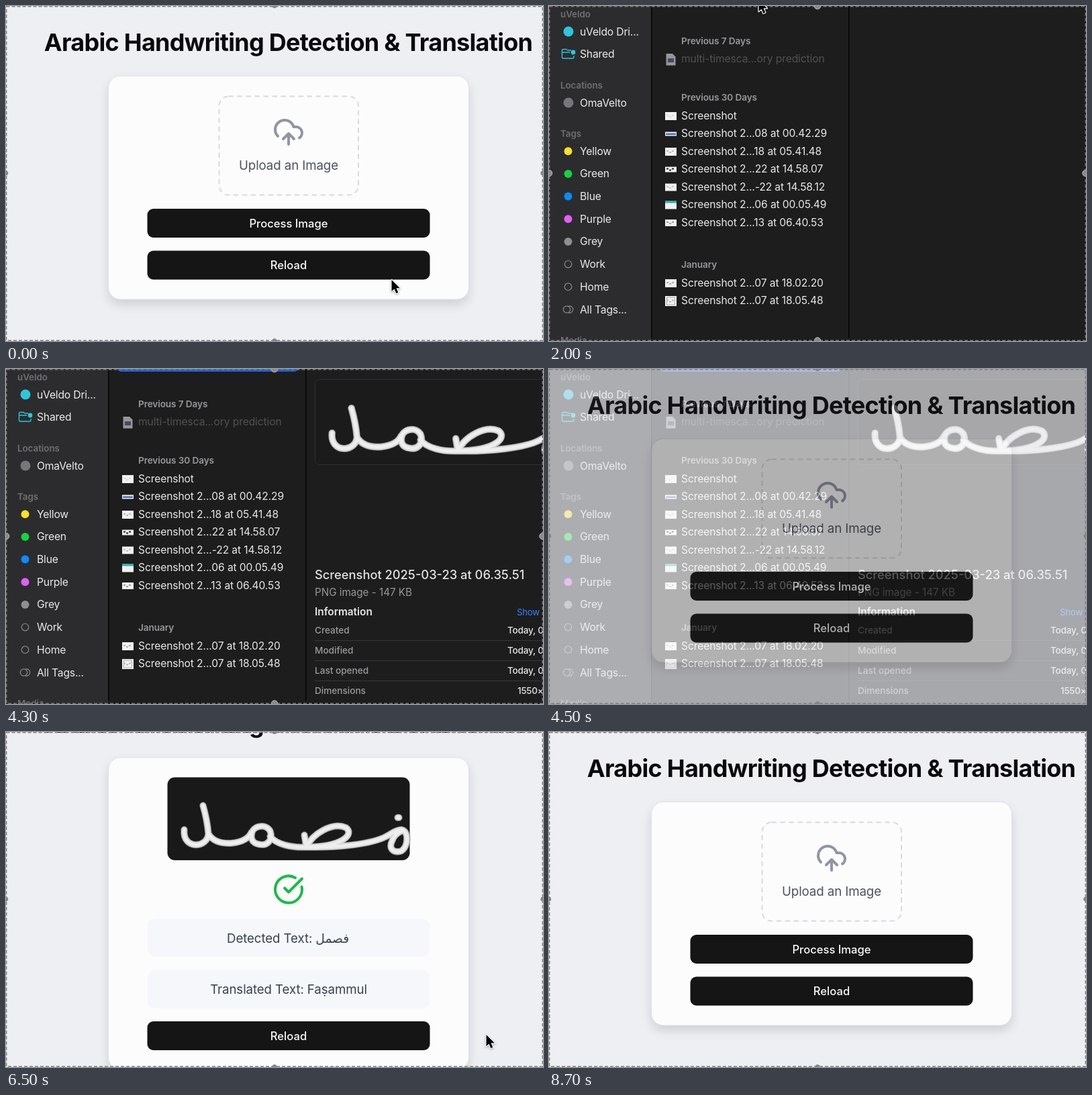
Animation of 800x499 px, one loop 8.8 s. Source, as an HTML page with a canvas:

```html
<!DOCTYPE html>
<html lang="en">
<head>
<meta charset="utf-8">
<title>Arabic Handwriting Detection &amp; Translation</title>
<style>
html, body { margin: 0; width: 100%; height: 100%; overflow: hidden; background: #eeeff3; }
canvas { display: block; width: 800px; height: 499px; }
</style>
</head>
<body>
<canvas id="stage" width="800" height="499"></canvas>
<script>
const W = 800, H = 499, LOOP = 8800, STEP = 100;
const ctx = document.getElementById('stage').getContext('2d');
const FONT = 'Inter, "Noto Sans", "DejaVu Sans", sans-serif';

const clamp = v => Math.max(0, Math.min(1, v));
const ramp = (t, a, b) => clamp((t - a) / (b - a));
const ease = v => v * v * (3 - 2 * v);

function text(s, x, y, size, color, { weight = 400, align = 'left', gap = 0 } = {}) {
  ctx.font = `${weight} ${size}px ${FONT}`;
  ctx.letterSpacing = gap + 'px';
  ctx.textAlign = align;
  ctx.textBaseline = 'alphabetic';
  ctx.fillStyle = color;
  ctx.fillText(s, x, y);
}

function box(x, y, w, h, r, fill, stroke, width = 1) {
  ctx.beginPath();
  ctx.roundRect(x, y, w, h, r);
  if (fill) { ctx.fillStyle = fill; ctx.fill(); }
  if (stroke) { ctx.strokeStyle = stroke; ctx.lineWidth = width; ctx.stroke(); }
}

function dot(x, y, r, fill, stroke, width = 1.2) {
  ctx.beginPath();
  ctx.arc(x, y, r, 0, 7);
  if (fill) { ctx.fillStyle = fill; ctx.fill(); }
  if (stroke) { ctx.strokeStyle = stroke; ctx.lineWidth = width; ctx.stroke(); }
}

// 24-unit line icon centred on x, y
function icon(d, x, y, size, color) {
  ctx.save();
  ctx.translate(x - size / 2, y - size / 2);
  ctx.scale(size / 24, size / 24);
  ctx.strokeStyle = color;
  ctx.lineWidth = 2;
  ctx.lineCap = ctx.lineJoin = 'round';
  ctx.stroke(new Path2D(d));
  ctx.restore();
}

const CLOUD_UP = 'M12 13v8M4 14.899A7 7 0 1 1 15.71 8h1.79a4.5 4.5 0 0 1 2.5 8.242M8 17l4-4 4 4';
const CHECK = 'M21.801 10A10 10 0 1 1 17 3.335M9 11l3 3L22 4';

const INK = new Path2D(
  'M53 42C57 56 60 72 61 84C60 106 22 108 25 78' +
  'M61 84C68 96 82 99 96 98C114 96 122 89 125 82' +
  'M125 86C126 72 146 68 153 80C158 94 148 102 138 100C128 99 123 93 126 82' +
  'M153 88C162 100 185 105 207 104' +
  'M207 104L204 86' +
  'M207 104C216 84 246 66 266 75C278 84 264 103 207 104' +
  'M207 104C250 105 304 100 326 88C334 84 340 78 349 78C360 80 359 104 348 110C336 113 329 106 335 94C338 86 344 82 349 80' +
  'M343 60L345 60');

function word(x, y, k) {
  ctx.save();
  ctx.translate(x, y);
  ctx.scale(k, k);
  ctx.lineCap = ctx.lineJoin = 'round';
  [['#7c7c7c', 10.4], ['#d8d8d8', 8.8], ['#eeeeee', 5]].forEach(([c, w]) => {
    ctx.strokeStyle = c;
    ctx.lineWidth = w;
    ctx.stroke(INK);
  });
  ctx.restore();
}

function button(label, y, hover) {
  box(210.5, y, 421, 43, 9, hover ? '#262626' : '#151515');
  text(label, 421, y + 27.5, 16.6, '#fafafa', { weight: 500, align: 'center' });
}

function field(label, y) {
  box(210.5, y, 421, 57, 12, '#f5f7fb');
  text(label, 421, y + 35.5, 18.7, '#374151', { align: 'center', gap: -0.1 });
}

function picture(y) {
  box(240.5, y, 361, 123.5, 11, '#191919');
  word(240.5, y, 1);
}

const CARD = { upload: 333, ready: 307.5, busy: 306.5, done: 465 };

function page(mode, hover) {
  ctx.fillStyle = '#eeeff3';
  ctx.fillRect(0, 0, W, H);
  const h = CARD[mode], top = 270.5 - h / 2;
  text('Arabic Handwriting Detection & Translation', 420.5, top - 37.5, 36, '#0a0a0c',
    { weight: 700, align: 'center', gap: -0.73 });

  ctx.save();
  ctx.shadowColor = 'rgba(0,0,0,.13)';
  ctx.shadowBlur = 16;
  ctx.shadowOffsetY = 8;
  box(152.5, top, 537, h, 18, '#fcfcfd');
  ctx.restore();
  box(152.5, top, 537, h, 18, null, '#dfe1e6');

  if (mode === 'upload') {
    ctx.setLineDash([7.5, 5.5]);
    box(317.5, top + 30.5, 207.5, 147, 14, null, '#d8dade', 2);
    ctx.setLineDash([]);
    icon(CLOUD_UP, 421, top + 84, 48, '#8f95a3');
    text('Upload an Image', 421, top + 140, 18.7, '#4b5160', { align: 'center', gap: -0.1 });
    button('Process Image', top + 198, false);
    button('Reload', top + 260.5, hover);
    return;
  }
  picture(top + 29.5);
  if (mode === 'done') {
    icon(CHECK, 421, top + 196.5, 48, '#16bd45');
    field('Detected Text: \u2067فصمل\u2069', top + 240);
    field('Translated Text: Faṣammul', top + 316.5);
    button('Reload', top + 393, hover);
    return;
  }
  ctx.globalAlpha = mode === 'busy' ? 0.5 : 1;
  button('Process Image', top + 172.5, false);
  ctx.globalAlpha = 1;
  button('Reload', top + 234.5, hover);
}

const TAGS = [['Yellow', '#ffe11f'], ['Green', '#12d53f'], ['Blue', '#0a8cff'], ['Purple', '#e45df5'], ['Grey', '#8e8e93'],
  ['Work'], ['Home']];

function sidebar(live) {
  const shade = 0.42 + 0.58 * live;
  const head = (s, y) => text(s, 17, y, 13.3, '#707074', { weight: 600 });
  const item = (s, y) => text(s, 46, y + 5.5, 15.7, '#eaeaec', { gap: -0.2 });
  ctx.globalAlpha = live;
  ctx.fillStyle = '#2c2c2f';
  ctx.fillRect(0, -10, 152, H + 20);
  ctx.globalAlpha = 0.75 + 0.25 * live;
  head('uVeldo', 17);
  head('Locations', 122.5);
  head('Tags', 195);
  head('Media', 502.5);
  ctx.globalAlpha = shade;
  dot(29, 38, 7.5, '#2cc6dc');
  item('uVeldo Dri...', 38);
  ctx.lineJoin = 'round';
  ctx.strokeStyle = '#2cc6dc';
  ctx.lineWidth = 1.4;
  ctx.stroke(new Path2D('M33 66H28L26 64.500H21Q19.500 64.500 19.500 66V76Q19.500 78 21.500 78H35Q37 78 37 76V74M19.500 69H31'));
  dot(36, 69, 3.4, '#2cc6dc');
  item('Shared', 71.5);
  dot(29, 144, 7.5, '#77777b');
  item('OmaVelto', 144);
  TAGS.forEach(([name, color], i) => {
    const y = 216.3 + i * 33.65;
    dot(28.5, y, color ? 6 : 5.3, color, color ? null : '#8b8b8f');
    if (color) {
      ctx.globalAlpha = 0.5 * (1 - live);
      dot(28.5, y, 6, '#77777b');
      ctx.globalAlpha = shade;
    }
    item(name, y);
  });
  dot(26.5, 452, 5.2, null, '#8b8b8f');
  ctx.beginPath();
  ctx.arc(30.5, 452, 5.2, -1.9, 1.9);
  ctx.stroke();
  item('All Tags...', 452);
  ctx.globalAlpha = 1;
}

const SHOTS = ['', ' 2...08 at 00.42.29', ' 2...18 at 05.41.48', ' 2...22 at 14.58.07', ' 2...-22 at 14.58.12',
  ' 2...06 at 00.05.49', ' 2...13 at 06.40.53'];
const OLDER = [' 2...07 at 18.02.20', ' 2...07 at 18.05.48'];

function thumb(y, i) {
  const h = [12, 6, 12, 8, 11, 12, 10, 12, 15][i];
  box(173, y - h / 2 + 1, 17, h, 0, '#f1f1f1');
  ctx.fillStyle = ['#d8d8e2', '#3f6fb8', '#b9b9b9', '#222222', '#c4c4c8', '#27b3b5', '#9c9c9c', '#a8b5a8', '#b4b4b4'][i];
  if (i === 1) ctx.fillRect(174, y, 15, 2.5);
  else if (i === 5) ctx.fillRect(173, y - 5, 17, 3);
  else for (let k = 0; k < 3; k++) ctx.fillRect(175 + k * 4, y - 1 + (k % 2) * 2, 3, 2);
  if (i === 8) box(175.5, y - 4.5, 12, 11, 0, null, '#aaa');
}

function files() {
  const head = (s, y) => text(s, 197, y + 5, 13.6, '#98989b', { weight: 600, gap: -0.1 });
  const row = (s, y, i) => {
    thumb(y, i);
    text('Screenshot' + s, 197, y + 5.5, 15.6, '#e9e9ea', { gap: -0.1 });
  };
  head('Previous 7 Days', 52);
  ctx.fillStyle = '#96969b';
  ctx.fill(new Path2D('M174.500 71H184L188.500 75.500V88.500H174.500Z'));
  box(177, 78, 9, 6, 0, '#454a5c');
  text('multi-timesca...ory prediction', 197, 84, 15.6, '#515153', { gap: -0.1 });
  head('Previous 30 Days', 136);
  SHOTS.forEach((s, i) => row(s, 163 + i * 26.5, i));
  head('January', 385);
  OLDER.forEach((s, i) => row(s, 412 + i * 26.5, i + 7));
}

function preview() {
  box(166, -20, 269, 24, 5, '#1e5fd2');
  box(460.5, 15.5, 372, 127, 6, '#1b1b1c', '#303032');
  word(460, 15, 1.03);
  text('Screenshot 2025-03-23 at 06.35.51', 460, 313, 18.3, '#e2e2e3', { weight: 500 });
  text('PNG image - 147 KB', 460, 338, 15.2, '#98989a');
  text('Information', 460, 366.5, 15.4, '#e8e8e9', { weight: 600 });
  text('Show', 761, 366.5, 13.2, '#2f86f5', { gap: -0.2 });
  [['Created', 'Today, 09:14', 747], ['Modified', 'Today, 09:14', 747], ['Last opened', 'Today, 09:14', 747],
    ['Dimensions', '1550×530', 762]].forEach(([name, value, x], i) => {
    const y = 394 + i * 30;
    text(name, 460, y, 13.6, '#9b9b9d', { weight: 500 });
    text(value, x, y, 13.5, '#e6e6e7', { weight: 500, gap: -0.2 });
    if (i < 3) { ctx.fillStyle = '#363638'; ctx.fillRect(460, y + 10, 340, 1); }
  });
}

function dialog(t) {
  const live = ramp(t, 1000, 1200);
  ctx.fillStyle = '#1d1d1e';
  ctx.fillRect(0, 0, W, H);
  ctx.save();
  ctx.translate(0, -3.5 * (1 - live));
  sidebar(live);
  ctx.fillStyle = '#050505';
  ctx.fillRect(152, -5, 1.5, 499);
  ctx.fillRect(446, -5, 1.5, 499);
  files();
  if (t >= 2700) preview();
  ctx.restore();
}

function marquee(dark) {
  ctx.setLineDash([5, 3]);
  ctx.strokeStyle = dark ? '#7a7a7a' : '#808083';
  ctx.lineWidth = 1.6;
  ctx.strokeRect(0.6, 0.6, W - 1.2, H - 1.2);
  ctx.setLineDash([]);
  [[400, 0], [400, 498.5], [0, 249], [799.5, 249]].forEach(([x, y]) =>
    dark ? dot(x, y, 4.8, '#8a8a8a', '#b4b4b4', 1) : dot(x, y, 3.2, '#858588'));
}

// [time, x, y] of the pointer tip
const POINTER = [[0, 574, 407], [500, 372, 239], [800, 372, 239], [1000, 451, 247], [1600, 385, 120], [2000, 312, -10],
  [2300, 312, -30], [3500, 330, -30], [4200, 770, 515], [4800, 735, 505], [5400, 508, 355], [5700, 472, 314],
  [6200, 472, 314], [6500, 715, 450], [7100, 715, 450], [7400, 600, 452], [7500, 600, 452], [7900, 640, 525], [8800, 640, 525]];

function pointerAt(t) {
  const i = POINTER.findIndex(p => p[0] > t);
  const [t0, x0, y0] = POINTER[i - 1], [t1, x1, y1] = POINTER[i];
  const k = ease(ramp(t, t0, t1));
  return [x0 + (x1 - x0) * k, y0 + (y1 - y0) * k];
}

const ARROW = new Path2D('M0 0V17L4 13.400L6.800 20L9.800 18.700L7 12.300H12.300Z');

function pointer([x, y]) {
  ctx.save();
  ctx.translate(x + 0.5, y + 1);
  ctx.lineJoin = 'round';
  ctx.shadowColor = 'rgba(0,0,0,.35)';
  ctx.shadowBlur = 3;
  ctx.shadowOffsetY = 1;
  ctx.strokeStyle = '#fff';
  ctx.lineWidth = 2.4;
  ctx.stroke(ARROW);
  ctx.shadowColor = 'transparent';
  ctx.fillStyle = '#000';
  ctx.fill(ARROW);
  ctx.restore();
}

function modeAt(t) {
  if (t < 4600 || t >= 7500) return 'upload';
  if (t < 5800) return 'ready';
  return t < 6200 ? 'busy' : 'done';
}

const buffer = document.createElement('canvas');
buffer.width = W;
buffer.height = H;

function draw(t) {
  const p = pointerAt(t), mode = modeAt(t);
  const hover = (mode === 'ready' && p[1] > 351 && p[1] < 395 && p[0] < 631) ||
    (mode === 'done' && p[1] > 431 && p[1] < 474 && p[0] < 631);
  const shown = t < 3000 ? ramp(t, 700, 1000) : 1 - ramp(t, 4300, 4600);
  if (shown > 0) {
    dialog(t);
    if (shown < 1) {
      buffer.getContext('2d').drawImage(ctx.canvas, 0, 0);
      page(mode, hover);
      ctx.globalAlpha = shown;
      ctx.drawImage(buffer, 0, 0);
      ctx.globalAlpha = 1;
    }
  } else page(mode, hover);
  marquee(shown > 0.5);
  pointer(p);
}

const start = performance.now();
function tick() {
  const t = (performance.now() - start) % LOOP;
  draw(Math.floor(t / STEP) * STEP);
  requestAnimationFrame(tick);
}
tick();
</script>
</body>
</html>
```
